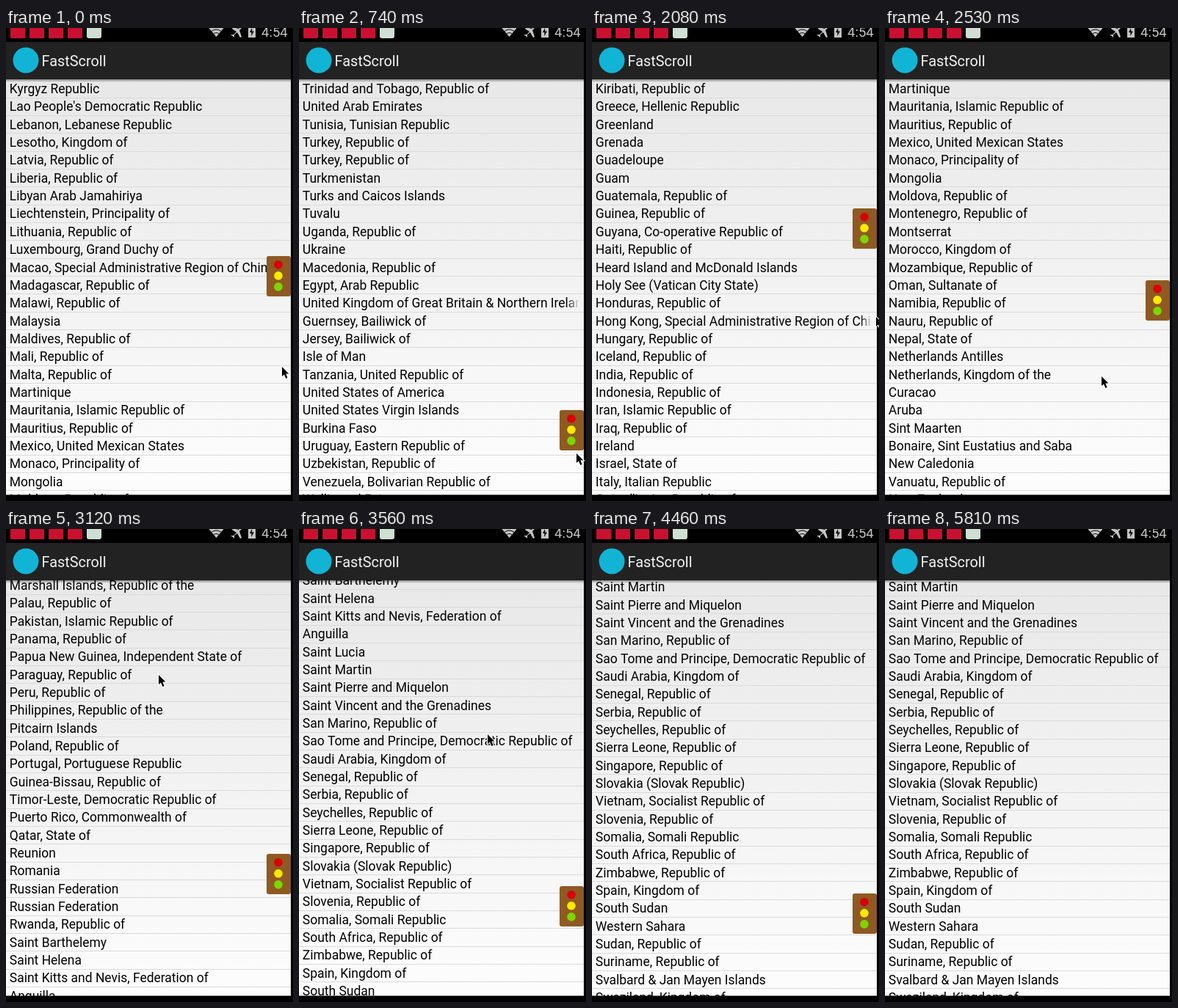
These frames come from a looping animation (391 by 645 pixels, 6.08 s). An HTML page with a canvas:

```html
<!DOCTYPE html>
<html lang="en">
<head>
<meta charset="utf-8">
<title>FastScroll</title>
<style>
html, body { margin: 0; width: 100%; height: 100%; overflow: hidden; background: #000; }
canvas { display: block; width: 391px; height: 645px; }
</style>
</head>
<body>
<canvas id="stage"></canvas>
<script>
const W = 391, H = 645, LOOP = 6080;
const LIST = { top: 70, bottom: 636.5, right: 388, row: 24.34, pad: 4.85, size: 17.47 };

// "*" stands for ", Republic of", "^" for ", Kingdom of"
const countries = `Afghanistan, Islamic Republic of|Albania*|Antarctica|Algeria, People's Democratic Republic of|American Samoa|Andorra, Principality of|Angola*|Antigua and Barbuda|Azerbaijan*|Argentina, Argentine Republic|Australia, Commonwealth of|Austria*|Bahamas, Commonwealth of the|Bahrain^|Bangladesh, People's Republic of|Armenia*|Barbados|Belgium^|Bermuda|Bhutan^|Bolivia*|Bosnia and Herzegovina|Botswana*|Bouvet Island (Bouvetoya)|Brazil, Federative Republic of|Belize|British Indian Ocean Territory (Chagos Archipelago)|Solomon Islands|British Virgin Islands|Brunei Darussalam|Bulgaria*|Myanmar, Union of|Burundi*|Belarus*|Cambodia^|Cameroon*|Canada|Cape Verde*|Cayman Islands|Central African Republic|Sri Lanka, Democratic Socialist Republic of|Chad*|Chile*|China, People's Republic of|Taiwan|Christmas Island|Cocos (Keeling) Islands|Colombia*|Comoros, Union of the|Mayotte|Congo, Republic of the|Congo, Democratic Republic of the|Cook Islands|Costa Rica*|Croatia*|Cuba*|Cyprus*|Czech Republic|Benin*|Denmark^|Dominica, Commonwealth of|Dominican Republic|Ecuador*|El Salvador*|Equatorial Guinea*|Ethiopia|Eritrea, State of|Estonia*|Faroe Islands|Falkland Islands (Malvinas)|South Georgia and the South Sandwich Islands|Fiji, Republic of the Fiji Islands|Finland*|Aland Islands|France, French Republic|French Guiana|French Polynesia|French Southern Territories|Djibouti*|Gabon, Gabonese Republic|Georgia|Gambia, Republic of the|Palestinian Territory, Occupied|Germany, Federal Republic of|Ghana*|Gibraltar
|Kiribati*|Greece, Hellenic Republic|Greenland|Grenada|Guadeloupe|Guam|Guatemala*|Guinea*|Guyana, Co-operative Republic of|Haiti*|Heard Island and McDonald Islands|Holy See (Vatican City State)|Honduras*|Hong Kong, Special Administrative Region of China|Hungary*|Iceland*|India*|Indonesia*|Iran, Islamic Republic of|Iraq*|Ireland|Israel, State of|Italy, Italian Republic|Cote d'Ivoire*|Jamaica|Japan|Kazakhstan*|Jordan, Hashemite Kingdom of|Kenya*|Korea, Democratic People's Republic of|Korea*|Kuwait, State of|Kyrgyz Republic|Lao People's Democratic Republic|Lebanon, Lebanese Republic|Lesotho^|Latvia*|Liberia*|Libyan Arab Jamahiriya|Liechtenstein, Principality of|Lithuania*|Luxembourg, Grand Duchy of|Macao, Special Administrative Region of China|Madagascar*|Malawi*|Malaysia|Maldives*|Mali*|Malta*|Martinique|Mauritania, Islamic Republic of|Mauritius*|Mexico, United Mexican States|Monaco, Principality of|Mongolia|Moldova*|Montenegro*|Montserrat|Morocco^|Mozambique*|Oman, Sultanate of|Namibia*|Nauru*|Nepal, State of|Netherlands Antilles|Netherlands, Kingdom of the|Curacao|Aruba|Sint Maarten|Bonaire, Sint Eustatius and Saba|New Caledonia|Vanuatu*|New Zealand|Nicaragua*|Niger*|Nigeria, Federal Republic of|Niue|Norfolk Island|Norway^|Northern Mariana Islands|United States Minor Outlying Islands|Micronesia, Federated States of|Marshall Islands, Republic of the|Palau*|Pakistan, Islamic Republic of|Panama*|Papua New Guinea, Independent State of|Paraguay*|Peru*|Philippines, Republic of the|Pitcairn Islands|Poland*|Portugal, Portuguese Republic|Guinea-Bissau*|Timor-Leste, Democratic Republic of|Puerto Rico, Commonwealth of|Qatar, State of|Reunion|Romania|Russian Federation|Russian Federation|Rwanda*|Saint Barthelemy|Saint Helena|Saint Kitts and Nevis, Federation of|Anguilla|Saint Lucia|Saint Martin|Saint Pierre and Miquelon|Saint Vincent and the Grenadines|San Marino*|Sao Tome and Principe, Democratic Republic of|Saudi Arabia^|Senegal*|Serbia*|Seychelles*|Sierra Leone*|Singapore*|Slovakia (Slovak Republic)|Vietnam, Socialist Republic of|Slovenia*|Somalia, Somali Republic|South Africa*|Zimbabwe*|Spain^|South Sudan|Western Sahara|Sudan*|Suriname*|Svalbard & Jan Mayen Islands|Swaziland^|Sweden^|Switzerland, Swiss Confederation|Syrian Arab Republic|Tajikistan*|Thailand^|Togo, Togolese Republic|Tokelau|Tonga^|Trinidad and Tobago*|United Arab Emirates|Tunisia, Tunisian Republic|Turkey*|Turkey*|Turkmenistan|Turks and Caicos Islands|Tuvalu|Uganda*|Ukraine|Macedonia*|Egypt, Arab Republic|United Kingdom of Great Britain & Northern Ireland|Guernsey, Bailiwick of|Jersey, Bailiwick of|Isle of Man|Tanzania, United Republic of|United States of America|United States Virgin Islands|Burkina Faso|Uruguay, Eastern Republic of|Uzbekistan*|Venezuela, Bolivarian Republic of|Wallis and Futuna|Samoa, Independent State of|Yemen|Zambia*`
  .split("|").map(s => s.trim().replace("*", ", Republic of").replace("^", ", Kingdom of"));
const base = countries.indexOf("Kiribati, Republic of");

// Key points: [step, value...]
const drag = [[0, 338.2], [1, 392], [2, 445], [3, 488], [4, 523], [5, 549], [6, 555], [7, 550], [8, 515],
  [9, 440], [11, 200], [12, 120], [13, 165], [14, 273.3], [15, 335], [16, 372]];
const fling = [[18, 49], [19, 57], [20, 70], [21, 82.25], [22, 91.2], [23, 98], [24, 102.53],
  [25, 104.8], [26, 106], [27, 106.7], [28, 107], [30, 107.16]];
const pointer = [[0, 376, 462], [5, 378, 580], [7, 378, 575], [11, 378, 56], [12, 380, 110], [14, 387, 394],
  [16, 385, 470], [18, 205, 480], [21, 208, 199], [24, 257, 280], [28, 362, 620], [30, 366, 660]];

function sample(keys, k, column = 1) {
  const i = keys.findIndex(key => key[0] >= k);
  if (i < 0) return keys[keys.length - 1][column];
  if (i === 0) return keys[0][column];
  const a = keys[i - 1], b = keys[i];
  return a[column] + (b[column] - a[column]) * (k - a[0]) / (b[0] - a[0]);
}

// The picture advances every 150 ms, with two shorter steps in each run of 15.
function stepStart(k) {
  const r = k % 15;
  return 150 * k - 20 * Math.floor(k / 15) - (r >= 4 ? 10 : 0) - (r >= 8 ? 10 : 0);
}
function stepAt(t) {
  let k = 0;
  while (k < 30 && stepStart(k + 1) <= t) k++;
  return k;
}

function stateAt(t) {
  const k = stepAt(t);
  let first, thumb;
  if (k <= 18) {
    thumb = sample(drag, k);
    first = Math.floor((thumb - 273.2) / 1.98);
  } else {
    first = sample(fling, k);
    thumb = 470.5 + (first - 82.25) * 2.18;
  }
  const [shift, alpha] = t < 5510 ? [0, 1] : t < 5660 ? [4, .85] : t < 5810 ? [20, .4] : [33, 0];
  return { first: first + base, thumb, shift, alpha, x: sample(pointer, k, 1), y: sample(pointer, k, 2) };
}

const canvas = document.getElementById("stage");
const c = canvas.getContext("2d");
const ratio = window.devicePixelRatio || 1;
canvas.width = W * ratio;
canvas.height = H * ratio;
c.scale(ratio, ratio);

function rect(x, y, w, h, fill) {
  c.fillStyle = fill;
  c.fillRect(x, y, w, h);
}
function dot(x, y, r, fill) {
  c.fillStyle = fill;
  c.beginPath();
  c.arc(x, y, r, 0, 7);
  c.fill();
}
function box(x, y, w, h, r, fill) {
  c.fillStyle = fill;
  c.beginPath();
  c.roundRect(x, y, w, h, r);
  c.fill();
}
function setFont(size) {
  c.font = `${size}px Roboto, sans-serif`;
}
function label(text, x, y, size, fill) {
  setFont(size);
  c.fillStyle = fill;
  c.fillText(text, x, y);
}
function ramp(x0, y0, x1, y1, from, to) {
  const g = c.createLinearGradient(x0, y0, x1, y1);
  g.addColorStop(0, from);
  g.addColorStop(1, to);
  return g;
}
function shape(path, x, y, fill) {
  c.save();
  c.translate(x, y);
  c.fillStyle = fill;
  c.fill(new Path2D(path));
  c.restore();
}

function drawBars() {
  rect(0, 0, W, H, "#000");
  for (const x of [6, 32, 58, 84]) rect(x, 0, 20, 14, "#c9102f");
  box(110, -6, 20, 20, 3, "#cfe0d2");
  const grey = "#c4c4c4";
  shape("M0 12L-11 -1Q0 -9 11 -1Z", 286.5, 0, grey);
  c.strokeStyle = "#000";
  c.lineWidth = 1;
  for (const r of [5.5, 10]) {
    c.beginPath();
    c.arc(286.5, 12, r, Math.PI * 1.2, Math.PI * 1.8);
    c.stroke();
  }
  shape("M15 -2L10 3L13 12L11 13L7 6L3 9L3 13L1 11L-2 9L2 9L6 5L0 1L1 -1L9 1L13 -3Z", 308, 0, grey);
  rect(330, -2, 10, 15, grey);
  shape("M5 0L2 6H4.5L4 11L8 4.5H5.3Z", 330, 0, "#000");
  label("4:54", 348, 12, 18.5, grey);
  rect(0, 19, LIST.right, 51, "#222");
  dot(27, 44, 17.5, "#12b4d6");
  label("FastScroll", 48.5, 52, 19.9, "#f3f3f3");
}

function drawList(first) {
  rect(0, LIST.top, LIST.right, LIST.bottom - LIST.top, ramp(0, LIST.top, 0, LIST.bottom, "#e8e8e8", "#fdfdfd"));
  const fade = ramp(365, 0, 382, 0, "#000", "rgba(0,0,0,0)");
  setFont(LIST.size);
  for (let i = Math.floor(first); i < first + 24 && i < countries.length; i++) {
    const y = 71 + (i - first) * LIST.row;
    rect(0, Math.round(y + LIST.row - .6), LIST.right, 1, "#dadada");
    const wide = c.measureText(countries[i]).width > 373;
    label(countries[i], LIST.pad, y + 18.1, LIST.size, wide ? fade : "#000");
  }
  rect(0, LIST.top, LIST.right, 4, ramp(0, LIST.top, 0, LIST.top + 4, "rgba(0,0,0,.4)", "rgba(0,0,0,0)"));
}

function drawThumb({ thumb, shift, alpha }) {
  if (!alpha) return;
  c.globalAlpha = alpha;
  const x = 355 + shift, y = Math.floor(thumb - 27.2);
  box(x, y, 33, 55, 3, "#8e5a22");
  ["#d9000a", "#ffea00", "#7dd600"].forEach((fill, i) => dot(x + 16, y + 11.7 + i * 15.1, 5.8, fill));
  c.globalAlpha = 1;
}

function drawPointer(x, y) {
  const arrow = new Path2D("M0 0V13L3 10.4L5.4 16L7.6 15L5.3 9.6H9.4Z");
  c.save();
  c.translate(x, y);
  c.strokeStyle = "#fff";
  c.lineWidth = 2.2;
  c.stroke(arrow);
  c.fillStyle = "#000";
  c.fill(arrow);
  c.restore();
}

function draw(t) {
  const s = stateAt(t);
  drawBars();
  c.save();
  c.beginPath();
  c.rect(0, LIST.top, LIST.right, H);
  c.clip();
  drawList(s.first);
  drawThumb(s);
  c.restore();
  rect(0, Math.ceil(LIST.bottom), W, H, "#000");
  drawPointer(s.x, s.y);
}

const start = performance.now();
function tick() {
  draw((performance.now() - start) % LOOP);
  requestAnimationFrame(tick);
}
tick();
</script>
</body>
</html>
```
